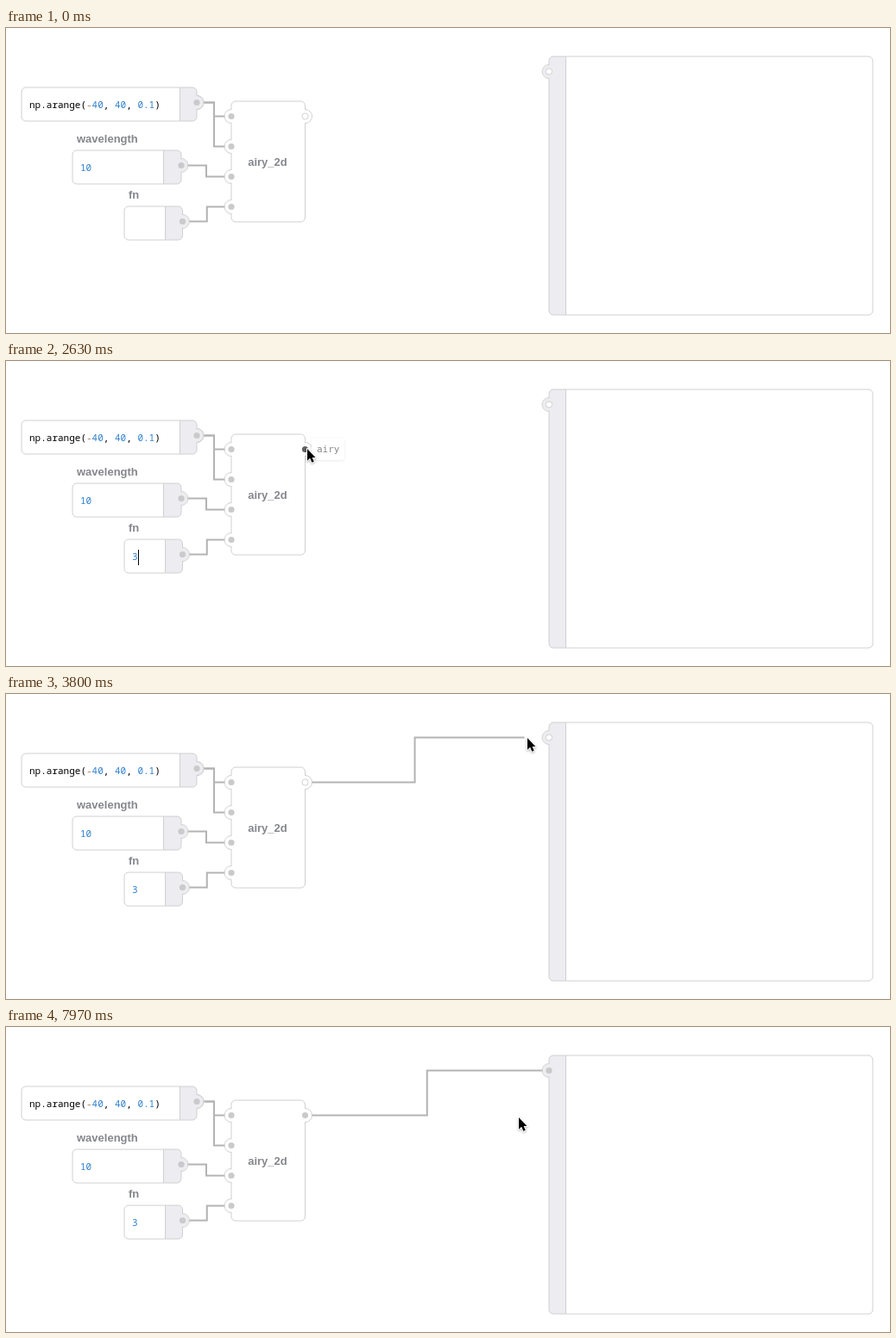
Write an HTML page that moves like this. It is 1024 by 354 pixels and loops after 8000 ms.

```html
<!DOCTYPE html>
<html lang="en">
<head>
<meta charset="utf-8">
<title>Node graph</title>
<style>
  html, body { margin: 0; width: 100%; height: 100%; overflow: hidden; background: #fff; }
  svg { display: block; width: 100vw; height: 100vh; }
  .box { fill: #fff; stroke: #d0d0d0; }
  .strip { fill: #ececf1; }
  .edge { fill: none; stroke: #d0d0d0; }
  .wire { fill: none; stroke: #b3b3b3; stroke-width: 2; }
  .dot { fill: #cacaca; }
  .dot.open { fill: #fff; stroke: #d0d0d0; }
  .dot.hot { fill: #606060; }
  .title { font: bold 13px "Liberation Sans", Arial, sans-serif; fill: #85878c; }
  .code { font: 11px "Noto Sans Mono", "DejaVu Sans Mono", monospace; fill: #000; white-space: pre; }
  .num { fill: #2f80d0; }
  .op { fill: #a67f59; }
  #tip rect { fill: #fff; filter: drop-shadow(0 1px 1.5px rgba(0, 0, 0, .08)); }
  #tip text { font-family: "DejaVu Sans Mono", monospace; fill: #888; }
  #arrow { fill: #000; stroke: #fff; stroke-width: 2; paint-order: stroke; stroke-linejoin: round;
    filter: drop-shadow(0 1px 1px rgba(0, 0, 0, .3)); }
  #beam { fill: none; stroke: #222; }
</style>
</head>
<body>
<svg viewBox="0 0 1024 354">
  <g id="wires"><path id="drag" class="wire"/></g>
  <g id="nodes"></g>
  <text class="title" x="82" y="133">wavelength</text>
  <text class="title" x="142" y="198">fn</text>
  <text class="title" x="303" y="160" text-anchor="middle">airy_2d</text>
  <text class="code" x="27" y="93">np.arange(<tspan class="op">-</tspan><tspan class="num">40</tspan>, <tspan class="num">40</tspan>, <tspan class="num">0.1</tspan>)</text>
  <text class="code num" x="86" y="166">10</text>
  <text class="code num" id="digit" x="146" y="231">3</text>
  <path id="caret" d="M0 219V237" stroke="#000"/>
  <g id="tip">
    <rect x="354" y="90" width="38" height="25" rx="3"/>
    <text class="code" x="360" y="106">airy</text>
  </g>
  <g id="pointer">
    <path id="arrow" d="M1 1V14.7L4.2 11.7L6.3 16.8L8.8 15.7L6.6 10.9H10.5Z"/>
    <path id="beam" d="M-3 -8.5Q0 -8.5 0 -6.5Q0 -8.5 3 -8.5M0 -6.5V6.5M-3 8.5Q0 8.5 0 6.5Q0 8.5 3 8.5M-1.5 3.5H1.5"/>
  </g>
</svg>
<script>
const $ = id => document.getElementById(id);

function add(parent, tag, attrs) {
  const el = document.createElementNS("http://www.w3.org/2000/svg", tag);
  for (const k in attrs) el.setAttribute(k, attrs[k]);
  return parent.appendChild(el);
}

// strip: x of the line that parts the tinted side from the content
function node(x, y, right, bottom, strip) {
  const g = $("nodes"), w = right - x, r = 5;
  const frame = { x, y, width: w, height: bottom - y, rx: r };
  if (!strip) return add(g, "rect", { ...frame, class: "box" });
  const outer = strip > x + w / 2 ? right : x;
  const inner = outer - Math.sign(outer - strip) * r;
  add(g, "path", { class: "strip",
    d: `M${strip} ${y}H${inner}Q${outer} ${y} ${outer} ${y + r}V${bottom - r}Q${outer} ${bottom} ${inner} ${bottom}H${strip}Z` });
  add(g, "path", { class: "edge", d: `M${strip} ${y}V${bottom}` });
  add(g, "rect", { ...frame, class: "edge" });
}

// side: 1 bulges right, 0 bulges left
function port(x, y, side, fill, kind = "dot") {
  const g = $("nodes");
  add(g, "circle", { cx: x, cy: y, r: 7.5, fill });
  add(g, "path", { class: "edge", d: `M${x} ${y - 8}A8 8 0 0 ${side} ${x} ${y + 8}` });
  return add(g, "circle", { cx: x, cy: y, r: 3.6, class: kind });
}

const route = (x1, y1, x2, y2) => `M${x1} ${y1}H${(x1 + x2) / 2}V${y2}H${x2}`;

const WHITE = "#fff", GREY = "#ececf1";
node(18, 69, 221, 108, 201.5);
node(77, 142, 203, 181, 182.5);
node(137, 207, 204.5, 246, 184.5);
node(261, 85, 346.5, 225);
node(629, 33, 1004, 333, 648.5);

const sources = [[221, 86.5], [221, 86.5], [203, 159.5], [204.5, 224.5]];
sources.forEach(([x, y], i) => {
  const row = 102.5 + 35 * i;
  add($("wires"), "path", { class: "wire", d: route(x, y, 261, row) });
  port(x, y, 1, GREY);
  port(261, row, 0, WHITE);
});
const out = port(346.5, 102.5, 1, WHITE, "dot open");
const sink = port(629, 50.5, 0, GREY, "dot open");

// pointer moves; px and py set how sharply each axis slows down
const moves = [
  { from: 300, ms: 570, x: 164, y: 231, px: 2, py: 2 },
  { from: 1900, ms: 600, x: 348, y: 101, px: 6, py: 1.7 },
  { from: 3200, ms: 800, x: 607, y: 50, px: 3, py: 8 },
  { from: 4500, ms: 170, x: 593, y: 104, px: 1.2, py: 1.4 }
];

function pointerAt(t) {
  let x = 203, y = 356;
  for (const m of moves) {
    const left = 1 - Math.min(1, Math.max(0, (t - m.from) / m.ms));
    x += (m.x - x) * (1 - left ** m.px);
    y += (m.y - y) * (1 - left ** m.py);
  }
  return [x, y];
}

const within = (t, a, b) => t >= a && t < b;
const show = (id, on) => $(id).setAttribute("visibility", on ? "visible" : "hidden");

function draw(t) {
  const [x, y] = pointerAt(t);
  const overField = x < 184 && y < 246;
  const shown = within(t, 330, 1500) || t >= 1900;
  $("pointer").setAttribute("transform", `translate(${x} ${y})`);
  show("arrow", shown && !overField);
  show("beam", shown && overField);

  // the caret blinks every 500 ms, anew after the click and the key press
  const typed = t >= 1500;
  const sinceInput = t - (typed ? 1500 : 870);
  show("digit", typed);
  show("caret", within(t, 870, 3200) && sinceInput % 1000 < 500);
  $("caret").setAttribute("transform", `translate(${typed ? 153.5 : 146.5} 0)`);

  const hover = within(t, 2400, 3200), linked = t >= 4030;
  const idle = linked ? "dot" : "dot open";
  show("tip", hover);
  out.setAttribute("class", hover ? "dot hot" : idle);
  sink.setAttribute("class", idle);

  // the loose end trails the pointer slightly
  const [ex, ey] = linked ? [629, 50] : pointerAt(t - 33);
  show("drag", t >= 3200);
  $("drag").setAttribute("d", route(346.5, 102.5, ex, ey + 0.5));
}

let start;
function tick(now) {
  start ??= now;
  draw((now - start) % 8000);
  requestAnimationFrame(tick);
}
draw(0);
requestAnimationFrame(tick);
</script>
</body>
</html>
```
